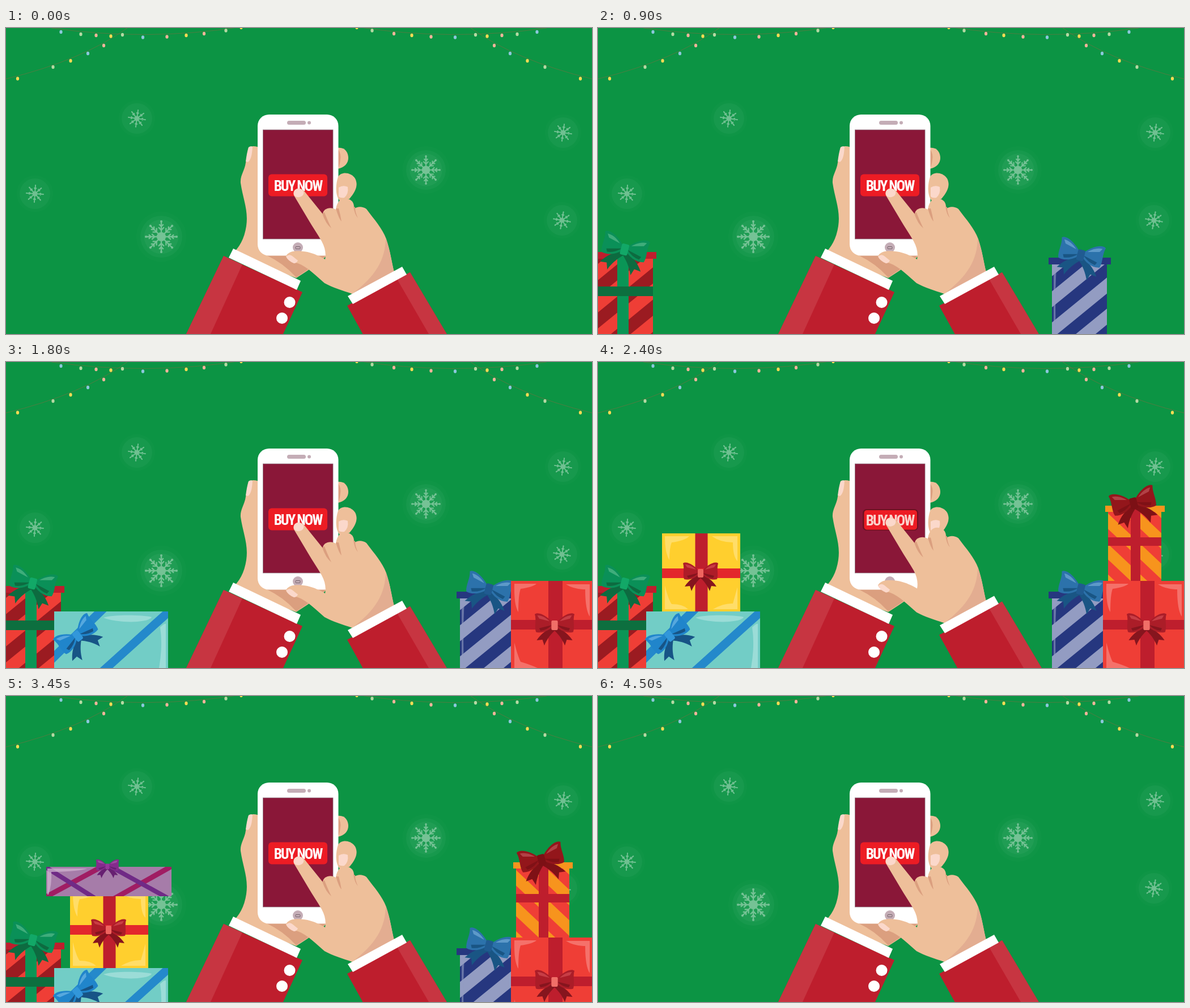
An HTML page for the animation above (4.65 s loop, 1034x541 px).

```html
<!DOCTYPE html>
<html lang="en">
<head>
<meta charset="utf-8">
<title>Holiday shopping</title>
<style>
  html, body { margin: 0; width: 100%; height: 100%; overflow: hidden; background: #0c9444; }
  #stage { display: block; width: 100%; height: 100%; }
  text { font: 600 25.5px "Roboto Condensed", "Liberation Sans Narrow", Roboto, sans-serif; font-stretch: 75%; letter-spacing: -2px; text-anchor: middle; }
</style>
</head>
<body>
<svg id="stage" viewBox="0 0 1034 541" preserveAspectRatio="none"></svg>
<script>
const STEP = 150, LOOP = 4650, EXIT_STEP = 22, LAST_STEP = 30;
const RED = '#be1e2d', BRIGHT = '#ef3e36', SKIN = '#eebf9a', SHADE = '#db9f7f', NAIL = '#fbd8cb';

const shape = (d, fill, extra = '') => `<path d="${d}" fill="${fill}" ${extra}/>`;
const line = (d, stroke, width, extra = '') => `<path d="${d}" fill="none" stroke="${stroke}" stroke-width="${width}" ${extra}/>`;
const rect = (x, y, w, h, fill, extra = '') => `<rect x="${x}" y="${y}" width="${w}" height="${h}" fill="${fill}" ${extra}/>`;
const circle = (x, y, r, fill, extra = '') => `<circle cx="${x}" cy="${y}" r="${r}" fill="${fill}" ${extra}/>`;
const clip = (x, y, w, h, inner) => `<svg x="${x}" y="${y}" width="${w}" height="${h}" overflow="hidden">${inner}</svg>`;

function garland() {
  const blue = '#8cc8dc', green = '#b5d9a3', pink = '#f2b49b', gold = '#fddb54';
  const bulbs = [
    [97, 7, blue], [132, 11, green], [159, 13, pink], [185, 14.5, gold], [205.5, 12, green],
    [172.5, 31, pink], [144.5, 45, blue], [114, 58, gold], [83, 69, green], [20.5, 89.5, gold],
    [241.5, 16.5, blue], [284, 15.5, pink], [318, 13, gold], [349.5, 10, pink], [388, 4.5, green], [415, -1, gold]
  ];
  const wire = line('M0 90Q135 57 214 0M80 0Q250 24 415 -2', '#77713f', .8, 'opacity=".8"');
  return wire + bulbs.map(([x, y, color]) => `<ellipse cx="${x}" cy="${y}" rx="2.6" ry="3.3" fill="${color}"/>`).join('');
}

function flake(x, y, size, halo, tilt, fine) {
  const arm = fine
    ? 'M0 0V-.9M0 -.4L-.17 -.58M0 -.4L.17 -.58M0 -.62L-.13 -.76M0 -.62L.13 -.76'
    : 'M0 0V-.95M0 -.5L-.13 -.66M0 -.5L.13 -.66';
  let arms = '';
  for (let a = 0; a < 360; a += 45) {
    arms += `<g transform="rotate(${a})">${line(arm, '#fff', fine ? .08 : .12)}${circle(0, -.93, .07, '#fff')}</g>`;
  }
  return `<g transform="translate(${x} ${y})">
    ${circle(0, 0, halo * 1.2, '#fff', 'opacity=".012"')}${circle(0, 0, halo, '#fff', 'opacity=".035"')}
    ${fine ? circle(0, 0, halo * .82, '#fff', 'opacity=".04"') : ''}
    <g opacity=".38" transform="rotate(${tilt}) scale(${size})">${arms}${circle(0, 0, .28, '#fff')}</g></g>`;
}

function bow(x, y, scale, turn, [main, dark, light, knot]) {
  const loop = shape('M0 0C-9 -13 -25 -22 -31 -17C-28 -8 -32 3 -29 11C-18 14 -8 8 0 0Z', main)
    + shape('M-27 -15C-18 -15 -11 -9 -8 -6L-24 -10Z', light, 'opacity=".7"')
    + shape('M-4 0L-24 5L-22 9Q-12 8 -4 0Z', dark);
  const tail = shape('M-2 3C-12 7 -21 13 -28 24L-19 23L-16 32C-12 22 -6 14 2 7Z', dark);
  const both = part => part + `<g transform="scale(-1 1)">${part}</g>`;
  return `<g transform="translate(${x} ${y}) rotate(${turn}) scale(${scale})">${both(tail)}${both(loop)}${rect(-5, -7, 10, 15, knot, 'rx="2"')}</g>`;
}

function stripedBox(x, y, w, h, base, stripe, first, period, width, slope) {
  let d = '';
  for (let s = first; s < h + w * 2; s += period) {
    d += slope < 0 ? `M-20 ${s + 16}L${w + 20} ${s - (w + 20) * .82}` : `M${w + 20} ${s + 18}L-20 ${s - (w + 20) * .95}`;
  }
  return clip(x, y, w, h, rect(0, 0, w, h, base) + line(d, stripe, width));
}

const gloss = (d, color, opacity = .75) => shape(d, color, `opacity="${opacity}"`);

const gifts = {
  red: () => stripedBox(-12, 408, 109, 140, BRIGHT, '#9b1b21', 5, 57, 22, -1)
    + rect(-12, 396, 115, 12, RED) + rect(34, 396, 20, 152, '#0a9556') + rect(-12, 457, 109, 17, '#0d6f3f')
    + bow(47, 391, 1.32, 14, ['#0a9058', '#0d6b40', '#55b98a', '#12a867']),

  blue: () => stripedBox(801, 417, 97, 130, '#26377f', '#939cc2', 8, 55, 22, -1)
    + rect(795, 406, 110, 12, '#26377f') + gloss('M804 424L809 421Q806 470 808 541H804Z', '#939cc2', .6)
    + bow(852, 401, 1.29, 14, ['#2c72ab', '#195584', '#72aad5', '#205b91']),

  teal: () => clip(85, 441, 201, 106, rect(0, 0, 201, 106, '#72cdc6')
      + line('M-12 92L94 -12M81 110L216 -12', '#2489cb', 15)
      + gloss('M87 11C105 5 157 6 172 10C168 21 110 21 87 11Z', '#a8e2dd')
      + gloss('M187 28Q198 18 197 24V100H185Q192 60 187 28Z', '#a8e2dd'))
    + bow(126, 484, 1.23, -38, ['#2085cb', '#175486', '#6db6e6', '#3297da']),

  square: () => rect(891, 387, 150, 160, BRIGHT) + rect(957, 387, 25, 160, RED) + rect(891, 456, 150, 17, RED)
    + gloss('M897 392H936Q930 398 908 401Q904 412 904 442Q896 430 897 392Z', '#f7827b')
    + gloss('M988 393H1030V450Q1022 438 1022 402Q1002 402 988 393Z', '#f7827b')
    + gloss('M897 496Q903 520 908 530Q925 535 938 541H897Z', '#f7827b')
    + bow(968, 465, 1.13, 0, ['#ab1d28', '#86151e', '#d34d53', '#f06f68']),

  yellow: () => rect(113, 303, 138, 138, '#ffcf2e') + rect(171.5, 303, 22, 138, RED) + rect(113, 365, 138, 17, '#e3272c')
    + gloss('M118 308H161Q153 316 130 319Q126 328 126 350Q118 338 118 308Z', '#ffe27b')
    + gloss('M201 308H246V352Q238 344 238 319Q216 319 201 308Z', '#ffe27b')
    + gloss('M118 395Q124 420 130 428Q150 428 159 437H118ZM246 398V437H203Q222 426 238 427Z', '#ffe27b')
    + bow(181, 373, 1, 0, ['#ae1c28', '#85141e', '#d64b51', '#ef655f']),

  orange: () => stripedBox(900, 265, 94, 122, BRIGHT, '#f7941d', -2, 54, 20, 1)
    + rect(895, 254, 105, 11, '#f7941d') + rect(940, 254, 17, 133, RED) + rect(900, 310, 94, 15, RED)
    + bow(945, 249, 1.29, -14, ['#93161b', '#7f1116', '#bd5458', '#7c1015']),

  purple: () => clip(71, 262, 221, 52, rect(0, 0, 221, 52, '#a67ca9')
      + line('M-4 55L105 -4M120 56L230 -6', '#a01d63', 9) + line('M-5 -2L85 55M107 -4L214 55', '#702a86', 8)
      + gloss('M2 3H72Q60 8 9 9Q10 32 4 49H2Z', '#cfb3d1'))
    + bow(179, 261, .66, 0, ['#842b8c', '#672071', '#a95aae', '#96389b'])
};

const leftHand = shape('M428 211Q437 207 446 211V380L566 402Q552 417 512 442L398 400Q419 383 424 350C428 322 418 302 414 274C413 260 421 253 423 238Z', SKIN)
  + shape('M460 402H565Q551 416 512 441Q490 416 460 402Z', SHADE)
  + shape('M423 236Q425 220 428 211Q431 208 435 210C434 223 433 232 427 237Z', NAIL)
  + shape('M585 212C598 210 604 220 604 230C604 239 597 247 585 249Z', SKIN)
  + shape('M585 213Q592 222 590 233Q589 244 585 249Z', SHADE);

const phone = rect(444, 153, 142.5, 249.5, '#fff', 'rx="20"')
  + rect(496, 164, 33, 7, '#c4adb6', 'rx="3.5"') + circle(535, 167.5, 3, '#c4adb6')
  + rect(453.5, 180, 123.5, 193, '#8a1738', 'stroke="#8d7580" stroke-width=".8"')
  + circle(515, 388, 9, '#c4adb6') + rect(511, 386.5, 8, 4, 'none', 'rx="1" stroke="#75636b"');

const fingerBeside = shape('M586 263C592 253 609 255 616 266C622 278 617 289 606 302L590 306C581 299 581 278 586 263Z', SKIN)
  + shape('M587 282Q595 277 603 281Q605 293 597 300Q590 301 587 298Z', NAIL);

const leftSleeve = shape('M384 403L523 467L489 541H318Z', RED) + shape('M384 403L417 418L361 541H318Z', '#c73541')
  + shape('M401 390L520 447L513 463L393 406Z', '#fff') + circle(500.5, 485, 10, '#fff') + circle(487, 513, 10, '#fff');

const rightHand = shape(`M508 296C505 285 517 279 526 288L559 329C559 319 573 315 582 321C584 305 593 299 603 302
    C611 304 615 310 614 320C620 315 629 315 636 320C650 339 664 354 671 373C678 394 680 412 685 432L611 470
    C594 464 576 459 562 451C549 440 532 422 515 416C503 413 495 409 494 403C500 393 514 393 532 396C544 399 553 403 563 409
    C565 399 563 388 557 377C549 363 541 352 533 338Z`, SKIN)
  + shape('M670 372C679 396 680 413 685 432L611 470C653 438 669 410 670 372Z', '#e3ad91')
  + shape('M558 328Q564 346 574 354Q566 337 562 326ZM582 319Q587 337 592 342Q590 330 587 319ZM613 315Q615 330 621 336Q616 326 616 317Z', SHADE)
  + shape('M508 295C505 284 519 280 525 289C528 297 514 304 508 295Z', NAIL)
  + shape('M494 404Q500 399 505 403L515 411Q513 416 508 416Q498 412 494 404Z', NAIL)
  + shape('M602 491L713 432L789 560H640Z', RED) + shape('M690 444L713 432L789 560H757Z', '#c73541')
  + shape('M699 422L707 436L612 488L603 474Z', '#fff');

const buttonUp = rect(463, 258.5, 104, 39, '#ed1c24', 'rx="6"') + '<text x="515" y="287.5" fill="#fff">BUY NOW</text>';
const buttonDown = rect(467, 260, 98, 38, '#6d1020', 'rx="7"') + rect(469.5, 262, 93.5, 34.5, '#ed1c24', 'rx="5"')
  + '<text x="515" y="288.5" fill="#fbd2cb">BUY NOW</text>';

// Gifts are listed in order of arrival, later ones in front.
const arrival = Object.keys(gifts);
arrival.sort((a, b) => ['red', 'blue', 'teal', 'square', 'yellow', 'orange', 'purple'].indexOf(a)
  - ['red', 'blue', 'teal', 'square', 'yellow', 'orange', 'purple'].indexOf(b));

document.getElementById('stage').innerHTML = rect(0, 0, 1034, 541, '#0c9444')
  + garland() + `<g transform="translate(1034 0) scale(-1 1)">${garland()}</g>`
  + flake(231, 160, 16, 27, 8) + flake(51, 293, 16, 27, 4) + flake(983, 185, 16, 27, 8) + flake(981, 340, 16, 27, 10)
  + flake(274, 369, 29, 37, 0, true) + flake(741, 251, 26, 35, 0, true)
  + `<g id="pile">${arrival.map(name => `<g id="${name}">${gifts[name]()}</g>`).join('')}</g>`
  + leftHand + phone + `<g id="up">${buttonUp}</g><g id="down">${buttonDown}</g>`
  + fingerBeside + leftSleeve + `<g id="hand">${rightHand}</g>`;

const part = id => document.getElementById(id);
const show = (id, on) => part(id).setAttribute('visibility', on ? 'inherit' : 'hidden');
const move = (id, y) => part(id).setAttribute('transform', `translate(0 ${y})`);

function pose(step) {
  // Each tap takes three steps and delivers one gift.
  const phase = step < EXIT_STEP ? step % 3 : 0;
  move('hand', [0, -8.5, -4][phase]);
  show('up', phase !== 1);
  show('down', phase === 1);
  arrival.forEach((name, i) => show(name, step >= 1 + i * 3));
  show('pile', step < LAST_STEP);
  move('pile', step < EXIT_STEP ? 0 : 40 + (step - EXIT_STEP - 1) * 35.8);
}

let lastStep = -1;
function tick() {
  const step = Math.floor(performance.now() % LOOP / STEP);
  if (step !== lastStep) pose(lastStep = step);
  requestAnimationFrame(tick);
}
tick();
</script>
</body>
</html>
```
